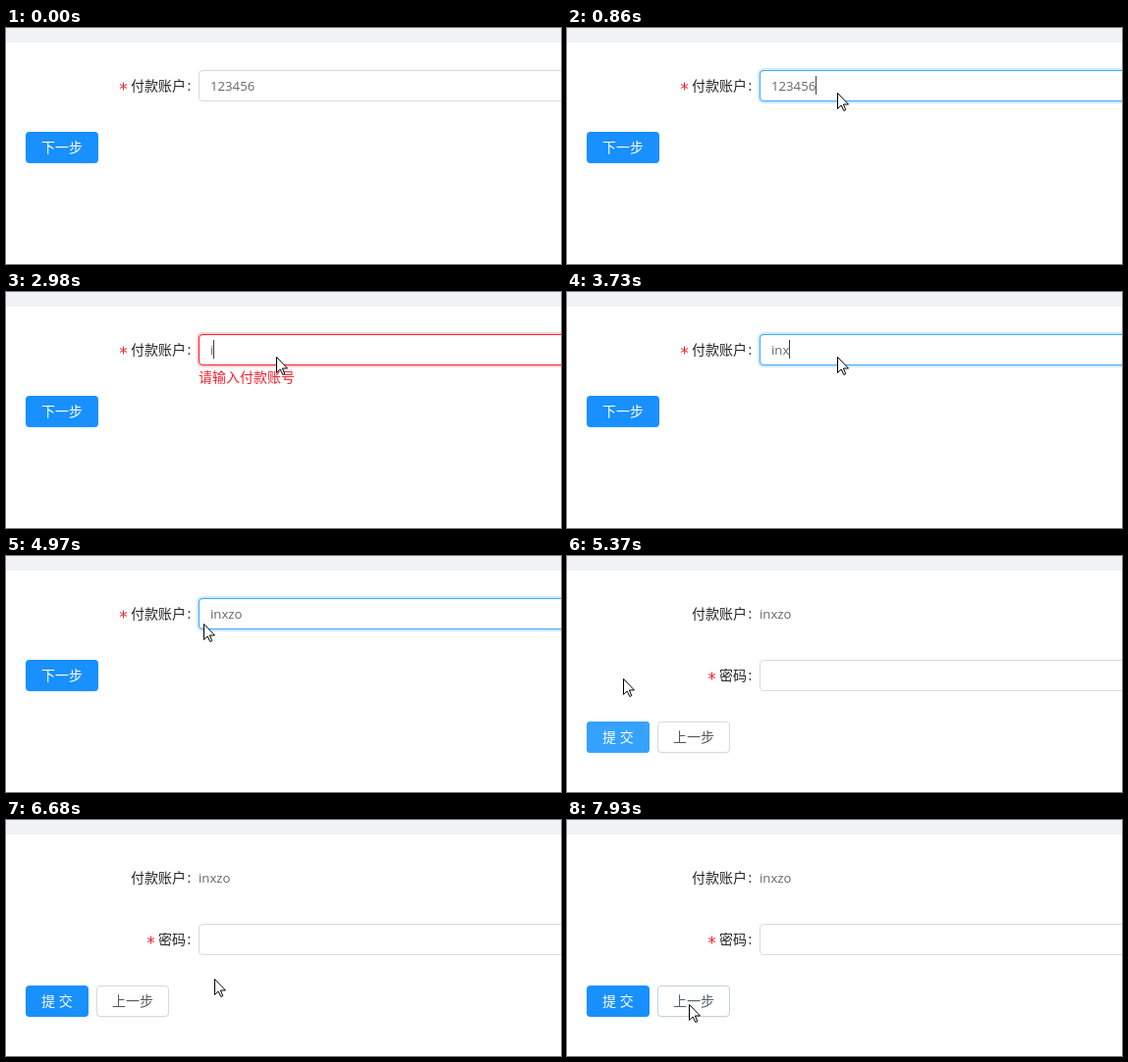
Write an HTML page that moves like this. It is 565 px wide and 241 px high and loops after 8 s.

```html
<!DOCTYPE html>
<html lang="zh">
<head>
<meta charset="utf-8">
<title>分步表单</title>
<style>
  html, body { margin: 0; width: 100%; height: 100%; overflow: hidden; background: #fff; }
  svg { display: block; }
  text { font: 14px "Open Sans", "Noto Sans CJK SC", "Noto Sans CJK", sans-serif; fill: #595959; white-space: pre; }
  .label { fill: #262626; }
  .latin { font-size: 13.2px; fill: #666; }
  .light { fill: #fff; font-weight: 500; }
  .help { fill: #f5222d; }
  .star { stroke: #f5222d; fill: none; }
  .box { fill: #fff; stroke: #d9d9d9; }
  .ring { fill: none; stroke-width: 2; stroke-opacity: .2; }
  .edge { fill: none; }
  .solid { fill: #1890ff; }
  .lit { fill: #40a9ff; }
  .lit-edge { fill: none; stroke: #40a9ff; }
  .lit-text { fill: #40a9ff; }
  .shade { fill-opacity: .045; }
</style>
</head>
<body>
<svg width="565" height="241" viewBox="0 0 565 241">
  <defs>
    <path id="star" class="star" d="M0-4V4M-3.5-2L3.5 2M-3.5 2L3.5-2"/>
    <rect id="field" x=".5" y=".5" width="500" height="31" rx="3.5"/>
    <rect id="halo" x="-1" y="-1" width="502" height="34" rx="5"/>
    <rect id="wide" width="74" height="32" rx="4"/>
    <rect id="narrow" width="64" height="32" rx="4"/>
    <rect id="outline" x=".5" y=".5" width="73" height="31" rx="3.5"/>
  </defs>
  <rect width="565" height="241" fill="#fff"/>
  <rect width="565" height="15" fill="#f0f2f5"/>
  <text class="label" x="127" y="64">付款账户</text>
  <text class="label" x="184.5" y="64">:</text>

  <g id="stepOne">
    <use href="#star" x="119.5" y="59.5"/>
    <g transform="translate(196 43)">
      <use href="#field" class="box"/>
      <g id="focus" stroke="#40a9ff">
        <use href="#halo" class="ring" stroke="#1890ff"/>
        <use href="#field" class="edge"/>
      </g>
      <g id="invalid" stroke="#f5222d">
        <use href="#halo" class="ring"/>
        <use href="#field" class="edge"/>
      </g>
    </g>
    <text id="value" class="latin" x="208" y="64"></text>
    <rect id="caret" y="49" width="1" height="19" fill="#404040"/>
    <text id="help" class="help" x="196" y="92">请输入付款账号</text>
    <g transform="translate(20 106)">
      <use href="#wide" class="shade" y="1"/>
      <use href="#wide" class="solid"/>
      <use href="#wide" class="lit" id="nextLit"/>
      <text class="light" x="16" y="21">下一步</text>
    </g>
  </g>

  <g id="stepTwo">
    <text class="latin" x="196" y="64">inxzo</text>
    <use href="#star" x="147.5" y="122.5"/>
    <text class="label" x="155" y="127">密码</text>
    <text class="label" x="184.5" y="127">:</text>
    <use href="#field" class="box" x="196" y="106"/>
    <g transform="translate(20 169)">
      <use href="#narrow" class="shade" y="1"/>
      <use href="#narrow" class="solid"/>
      <use href="#narrow" class="lit" id="submitLit"/>
      <text class="light" x="16" y="21">提 交</text>
    </g>
    <g transform="translate(92 169)">
      <use href="#wide" class="shade" y="1"/>
      <use href="#outline" class="box"/>
      <text x="16" y="21">上一步</text>
      <g id="backLit">
        <use href="#outline" class="lit-edge"/>
        <text class="lit-text" x="16" y="21">上一步</text>
      </g>
    </g>
  </g>

  <path id="cursor" d="M.5.5V16.5L4.2 13L6.8 18.5L8.8 17.6L6.4 12H11.5Z"
        fill="#fff" stroke="#000" stroke-linejoin="round"/>
</svg>
<script>
const LOOP = 8000;
const PAGE_TURN = 5270;
const OLD_VALUE = '123456';
const NEW_VALUE = 'inxzo';
const erasures = [1480, 1630, 1705, 1950, 2020, 2190];
const keystrokes = [2980, 3290, 3730, 3900, 4130];

const start = { x: 553, y: 141 };
const moves = [
  { from: 70, to: 545, x: 275, y: 66 },
  { from: 4830, to: 4970, x: 201, y: 69 },
  { from: 4970, to: 5210, x: 57, y: 125 },
  { from: 6300, to: 6680, x: 212, y: 162 },
  { from: 6900, to: 7200, x: 185, y: 160 },
  { from: 7200, to: 7450, x: 208, y: 145 },
  { from: 7530, to: 7930, x: 124, y: 188 }
];

const $ = id => document.getElementById(id);
const countPast = (times, t) => times.filter(time => time <= t).length;
const between = (t, from, to) => t >= from && t < to;

function ramp(t, from, length = 300) {
  const k = Math.min(1, Math.max(0, (t - from) / length));
  return k * k * (3 - 2 * k);
}

function fade(id, opacity) {
  $(id).setAttribute('opacity', opacity);
}

function pointerAt(t) {
  return moves.reduce((p, m) => {
    const k = ramp(t, m.from, m.to - m.from);
    return { x: p.x + (m.x - p.x) * k, y: p.y + (m.y - p.y) * k };
  }, start);
}

function valueAt(t) {
  const typed = countPast(keystrokes, t);
  return typed
    ? NEW_VALUE.slice(0, typed)
    : OLD_VALUE.slice(0, OLD_VALUE.length - countPast(erasures, t));
}

function drawInput(t) {
  const value = valueAt(t);
  $('value').textContent = value;
  const width = value ? $('value').getComputedTextLength() : 0;
  $('caret').setAttribute('x', Math.floor(208 + width));
  const caretOn = between(t, 540, 1160) || between(t, 1630, 2810) || between(t, 2980, 4660);
  fade('caret', caretOn ? 1 : 0);

  const error = ramp(t, 2190) - ramp(t, 2980);
  fade('focus', ramp(t, 460) * (1 - error));
  fade('invalid', error);
  fade('help', error);
  $('help').setAttribute('transform', `translate(0 ${-5 * (1 - error)})`);
}

function draw(t) {
  const turned = t >= PAGE_TURN;
  $('stepOne').style.display = turned ? 'none' : '';
  $('stepTwo').style.display = turned ? '' : 'none';
  if (!turned) drawInput(t);

  fade('nextLit', ramp(t, 5100, 200));
  fade('submitLit', 1 - ramp(t, PAGE_TURN));
  fade('backLit', ramp(t, 7860));

  const { x, y } = pointerAt(t);
  $('cursor').setAttribute('transform', `translate(${Math.round(x)} ${Math.round(y)})`);
  fade('cursor', t < 70 ? 0 : 1);
}

const began = performance.now();
function tick() {
  draw((performance.now() - began) % LOOP);
  requestAnimationFrame(tick);
}
tick();
</script>
</body>
</html>
```
